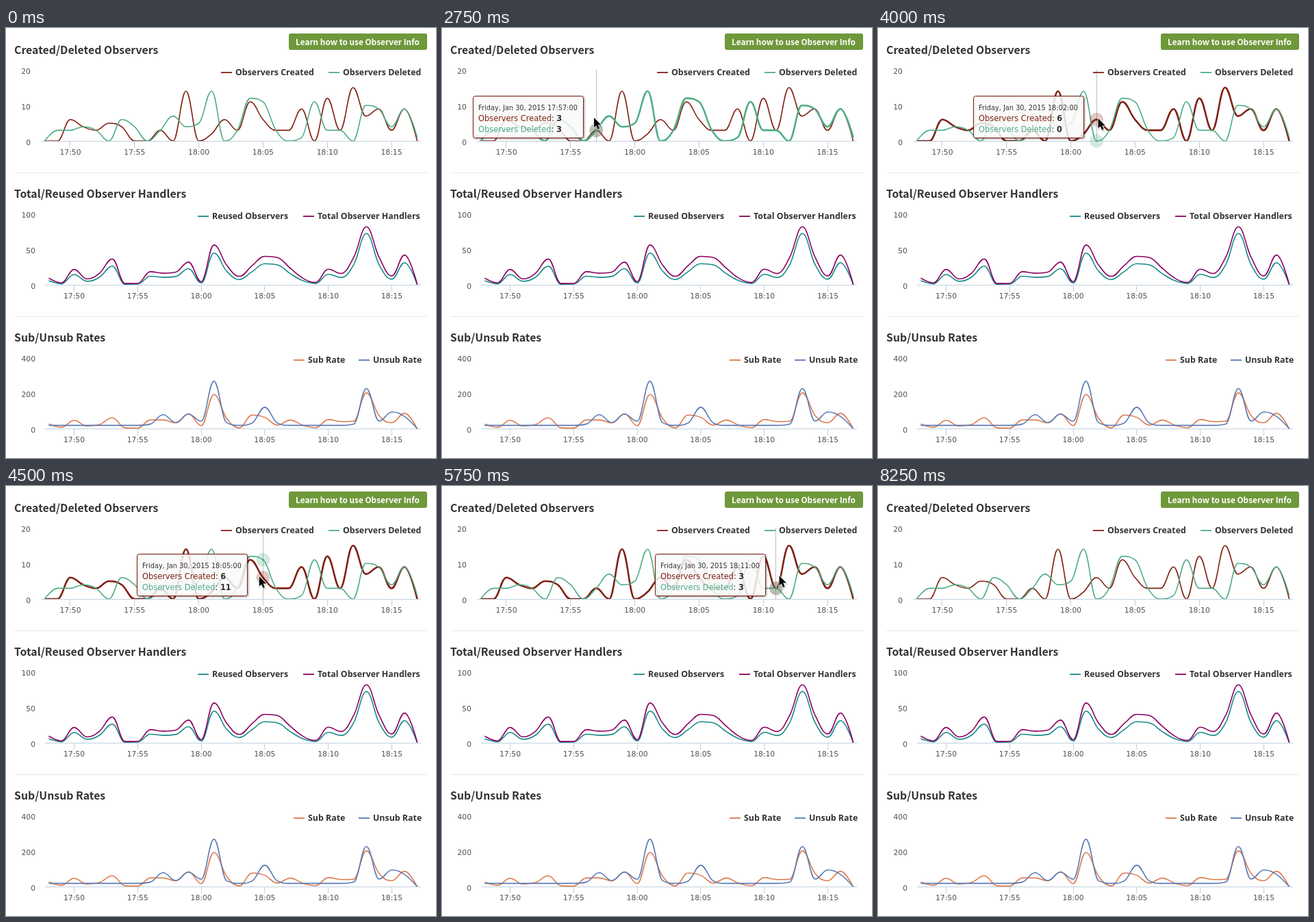
Animation of 628x628 px, one loop 8750 ms. Source, as an HTML page:

```html
<!DOCTYPE html>
<html lang="en">
<head>
<meta charset="utf-8">
<title>Observer charts</title>
<style>
  html, body { margin: 0; width: 100%; height: 100%; overflow: hidden; background: #fff; }
  svg { display: block; width: 100vw; height: 100vh; }
  text { white-space: pre; }
  .title { font: bold 15.85px "Noto Sans CJK JP", "Noto Sans CJK SC", "Noto Sans CJK", sans-serif; fill: #333; }
  .button { font: bold 11.85px "Noto Sans CJK JP", "Noto Sans CJK SC", "Noto Sans CJK", sans-serif; fill: #fff; }
  .legend { font: bold 12.4px "Open Sans", sans-serif; fill: #333; }
  .label { font: 10.8px "DejaVu Sans", sans-serif; fill: #505050; }
  .tip { font: 11.4px "DejaVu Sans", sans-serif; fill: #333; }
  .date { font-size: 9.8px; }
  .value { font-weight: bold; }
  .line { fill: none; stroke-width: 1.6; stroke-linejoin: round; }
</style>
</head>
<body>
<svg id="stage" viewBox="0 0 628 628"></svg>
<script>
const LOOP = 8750, STEP = 250;
const PLOT_HEIGHT = 104, RIGHT = 606;
const MINUTES = 30, FIRST_MINUTE = 17 * 60 + 48;

// Bell-shaped bursts [minute, height, spread] on a constant floor; the last minute has barely begun.
const bursts = (floor, peaks) => Array.from({ length: MINUTES }, (_, i) =>
  i === MINUTES - 1 ? 1 : peaks.reduce((sum, [minute, height, spread = 0.7]) =>
    sum + height * Math.exp(-(((i - minute) / spread) ** 2)), floor));

const created = [0,0,6,4,3,5,4,0,0,3,0,14,0,2,6,3,11,6,3,3,9,0,12,3,15,7,9,3,9,0];
const deleted = [0,3,3,4,3,0,6,4,0,3,7,4,5,14,0,3,12,11,3,0,1,11,3,3,0,10,9,4,9,1];
const handlers = bursts(1, [[0, 9], [2.25, 24], [4.7, 43], [8.1, 18], [9.4, 17], [10.8, 34],
  [13.3, 66], [17.4, 41, 2.1], [22.35, 27], [25, 81, 1.15], [27.9, 42]]);
const reused = handlers.map(v => v * (0.6 + 0.0035 * v));
const subs = bursts(4, [[0, 24], [2.2, 48], [4.75, 67], [8.5, 78], [10.75, 92], [13.2, 206],
  [16.45, 112], [19, 46, 1], [22.25, 55], [23.6, 42], [25.25, 225], [27.75, 96]]);
const unsubs = bursts(20, [[9, 60], [11, 63], [13, 248, 0.6], [17, 102], [25.1, 213, 0.6], [27.4, 105]]);

const charts = [
  { title: 'Created/Deleted Observers', left: 51, max: 20, shift: 0, series: [
    { name: 'Observers Created', color: '#7f2113', legendX: 314, data: created },
    { name: 'Observers Deleted', color: '#50ac87', legendX: 471, data: deleted } ] },
  { title: 'Total/Reused Observer Handlers', left: 57, max: 100, shift: 0.6, series: [
    { name: 'Reused Observers', color: '#178a88', legendX: 280, data: reused },
    { name: 'Total Observer Handlers', color: '#8b0062', legendX: 434, data: handlers } ] },
  { title: 'Sub/Unsub Rates', left: 57, max: 400, shift: 0.6, series: [
    { name: 'Sub Rate', color: '#dd7b4e', legendX: 420, data: subs },
    { name: 'Unsub Rate', color: '#5b7bb5', legendX: 515, data: unsubs } ] }
];
charts.forEach((chart, i) => { chart.base = 165 + 210 * i; });

// Pointer key points: time, x, y
const path = [
  [1250, 255, 127], [1500, 229, 77], [1750, 229, 77], [2000, 216, 131], [2500, 207, 131],
  [3250, 255, 131], [3500, 268, 86], [4000, 322.5, 132], [5000, 419, 132], [5500, 482, 131],
  [6250, 516.5, 131], [7750, 516.5, 131], [8000, 490, 105]
];
const POINTER_ON = 1250, HOVER_ON = 2000, EMPHASIS_ON = 2750, HOVER_SETTLED = 6500, ALL_OFF = 8250;

const mix = (a, b, k) => a + (b - a) * k;
const crisp = v => Math.floor(v) + 0.5;
const clock = i => {
  const m = FIRST_MINUTE + i;
  return `${Math.floor(m / 60)}:${String(m % 60).padStart(2, '0')}`;
};
const text = (x, y, cls, body, more = '') => `<text x="${x}" y="${y}" class="${cls}" ${more}>${body}</text>`;
const rule = (x1, y1, x2, y2, color, width = 1) =>
  `<path d="M${x1} ${y1}L${x2} ${y2}" stroke="${color}" stroke-width="${width}"/>`;

// The time axis keeps a padding of one percent on both sides.
function minuteX(chart, i) {
  const width = RIGHT - chart.left, pad = width * 0.01 / 1.02;
  return chart.left + pad + i * (width - 2 * pad) / (MINUTES - 1);
}
const point = (chart, series, i) => ({
  x: minuteX(chart, i),
  y: chart.base + chart.shift - series.data[i] / chart.max * PLOT_HEIGHT
});

// Smooth curve whose control points never overshoot their neighbours.
function spline(points) {
  let d = `M${points[0].x} ${points[0].y}`;
  let out = points[0];
  for (let i = 1; i < points.length; i++) {
    const prev = points[i - 1], p = points[i], next = points[i + 1];
    let into = p, onward = p;
    if (next) {
      const near = q => ({ x: mix(p.x, q.x, 0.4), y: mix(p.y, q.y, 0.4) });
      into = near(prev);
      onward = near(next);
      const shift = (onward.y - into.y) * (onward.x - p.x) / (onward.x - into.x) + p.y - onward.y;
      into.y += shift;
      onward.y += shift;
      const limit = (a, b, q) => {
        const y = Math.max(Math.min(q.y, p.y), Math.min(Math.max(q.y, p.y), a.y));
        if (y !== a.y) { a.y = y; b.y = 2 * p.y - y; }
      };
      limit(into, onward, prev);
      limit(onward, into, next);
    }
    d += `C${[out.x, out.y, into.x, into.y, p.x, p.y].map(v => v.toFixed(2)).join(' ')}`;
    out = onward;
  }
  return d;
}

function drawChart(chart, index) {
  const { base, left } = chart, top = base - PLOT_HEIGHT;
  let svg = text(12, base - 127, 'title', chart.title);
  if (index) svg += rule(12, base - 163.5, 616, base - 163.5, '#e9e9e9');
  for (const part of [0, 0.5, 1])
    svg += text(index ? 43 : 36, base + 5.5 - part * PLOT_HEIGHT, 'label', part * chart.max, 'text-anchor="end"');
  svg += rule(left, base + 0.5, RIGHT, base + 0.5, '#c0d0e0');
  for (let i = 2; i < MINUTES; i += 5) {
    const x = minuteX(chart, i);
    svg += rule(crisp(x), base, crisp(x), base + 10, '#c0d0e0') +
      text(x, base + 20, 'label', clock(i), 'text-anchor="middle"');
  }
  svg += `<clipPath id="plot${index}"><rect x="${left}" y="${top}" width="${RIGHT - left}" height="${PLOT_HEIGHT + chart.shift}"/></clipPath>`;
  svg += `<g id="under${index}"></g><g clip-path="url(#plot${index})">`;
  for (const s of chart.series)
    svg += `<path class="line" stroke="${s.color}" d="${spline(s.data.map((_, i) => point(chart, s, i)))}"/>`;
  svg += '</g>';
  for (const s of chart.series)
    svg += rule(s.legendX, top + 4, s.legendX + 16, top + 4, s.color, 1.8) +
      text(s.legendX + 21, top + 8, 'legend', s.name);
  return svg;
}

function drawHalos(minute) {
  return charts[0].series.map(s => {
    const { x, y } = point(charts[0], s, minute);
    return `<g fill="${s.color}"><circle cx="${x}" cy="${y}" r="10" opacity=".25"/><circle cx="${x}" cy="${y}" r="1.5"/></g>`;
  }).join('');
}

function drawTooltip(minute, x, y) {
  const box = (offset, style) =>
    `<rect x="${x + 0.5 + offset}" y="${y + 0.5 + offset}" width="161" height="61" rx="3" ${style}/>`;
  let svg = '';
  for (const width of [5, 3, 1])
    svg += box(1, `fill="none" stroke="#000" stroke-opacity="${0.175 - width * 0.025}" stroke-width="${width}"`);
  svg += box(0, `fill="#f9f9f9" fill-opacity=".85" stroke="${charts[0].series[0].color}"`);
  svg += text(x + 8, y + 21, 'tip date', `Friday, Jan 30, 2015 ${clock(minute)}:00`);
  charts[0].series.forEach((s, i) => {
    svg += text(x + 8, y + 37 + 16 * i, 'tip',
      `<tspan fill="${s.color}">${s.name}</tspan>: <tspan class="value">${s.data[minute]}</tspan>`);
  });
  return svg;
}

function drawCursor({ x, y }) {
  const arrow = 'M0 0V14.5L3.3 11.5L5.7 17L8.2 16L5.8 10.6H10.4Z';
  return `<g transform="translate(${x - 1} ${y})"><path d="${arrow}" transform="translate(.5 1.5)" stroke="#000" stroke-width="2" opacity=".15"/>` +
    `<path d="${arrow}" stroke="#fff" stroke-width="1.6" paint-order="stroke"/></g>`;
}

function pointerAt(time) {
  const next = path.findIndex(key => key[0] > time);
  const [t1, x1, y1] = path.at(next < 0 ? -1 : next);
  const [t0, x0, y0] = path.at(next < 0 ? -1 : Math.max(next - 1, 0));
  const k = t1 > t0 ? (time - t0) / (t1 - t0) : 0;
  return { x: mix(x0, x1, k), y: mix(y0, y1, k) };
}

function minuteAt(time) {
  const origin = minuteX(charts[0], 0);
  return Math.round((pointerAt(time).x - origin) / (minuteX(charts[0], 1) - origin));
}

// During the middle of the sweep the emphasis swaps with every step.
function emphasisAt(time) {
  if (time < EMPHASIS_ON || time >= ALL_OFF) return -1;
  if (time < 3500 || time >= 6000) return 1;
  return time < 5500 ? time / STEP % 2 : 0;
}

const stage = document.getElementById('stage');
stage.innerHTML = charts.map(drawChart).join('') +
  '<rect x="413" y="8" width="202" height="24" rx="3" fill="#6f983b"/>' +
  text(423, 24.5, 'button', 'Learn how to use Observer Info') + '<g id="hover"></g>';

const crosshair = document.getElementById('under0');
const hover = document.getElementById('hover');
const lines = [...stage.querySelectorAll('.line')].slice(0, 2);

function show(time) {
  const active = time >= HOVER_ON && time < ALL_OFF;
  let overlay = '';
  crosshair.innerHTML = '';
  if (active) {
    const hoverTime = Math.min(time, HOVER_SETTLED);
    const minute = minuteAt(hoverTime);
    const x = minuteX(charts[0], minute), lastX = minuteX(charts[0], minuteAt(hoverTime - STEP));
    // The tooltip trails a little behind the hovered minute.
    const tipX = Math.round(mix(lastX, x, 0.8) - 176.7);
    crosshair.innerHTML = rule(crisp(x), 61, crisp(x), 165, '#c0c0c0');
    overlay = drawHalos(minute) + drawTooltip(minute, tipX, time === HOVER_ON ? 52 : 99);
  }
  if (time >= POINTER_ON && time < ALL_OFF) overlay += drawCursor(pointerAt(time));
  hover.innerHTML = overlay;
  lines.forEach((line, i) => { line.style.strokeWidth = i === emphasisAt(time) ? 2.6 : 1.6; });
}

let shown;
function tick() {
  const time = Math.floor(performance.now() % LOOP / STEP) * STEP;
  if (time !== shown) show(shown = time);
  requestAnimationFrame(tick);
}
tick();
</script>
</body>
</html>
```
